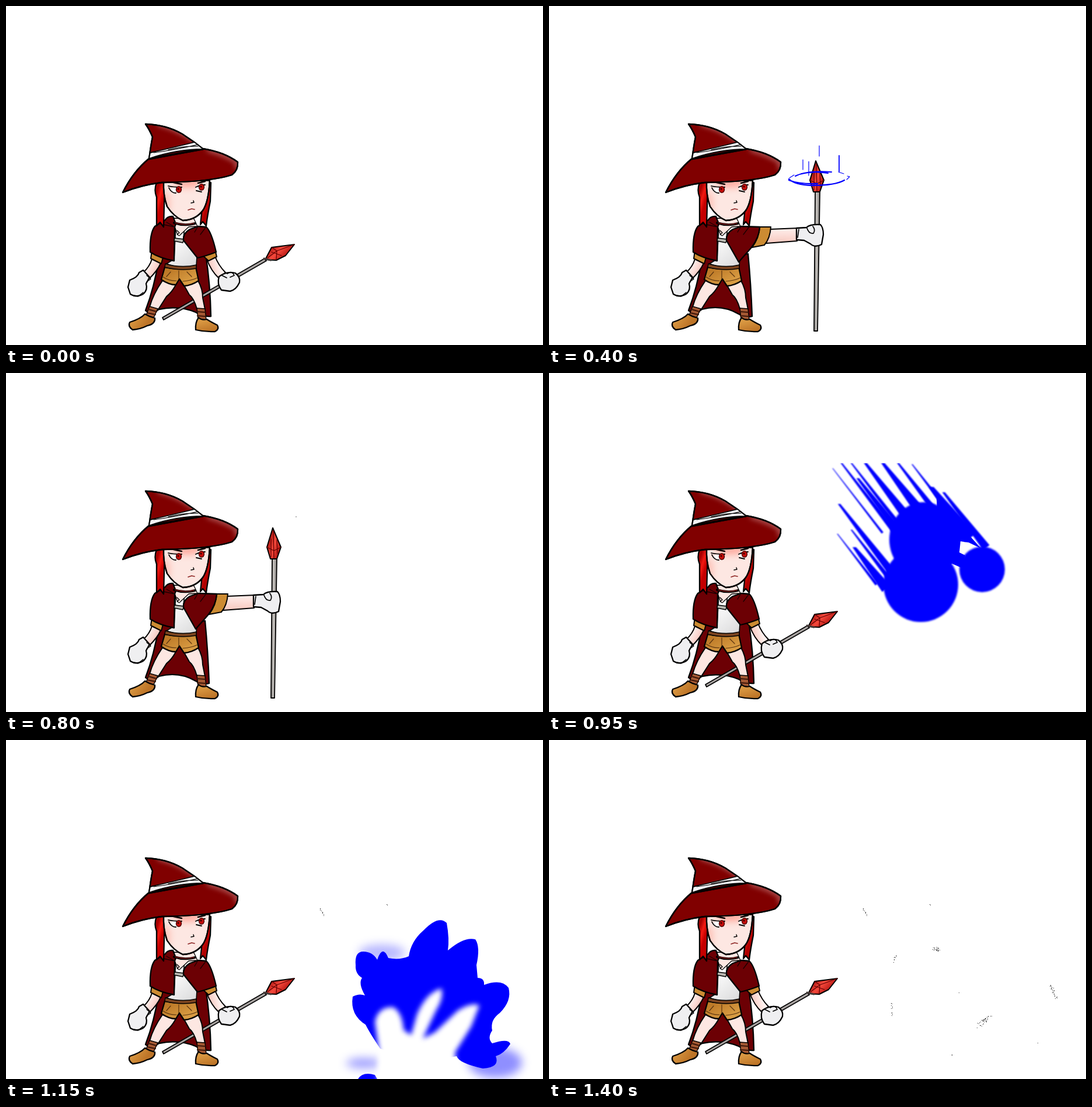
Animation of 920x580 px, one loop 1450 ms. Source, as an HTML page with a canvas:

```html
<!DOCTYPE html>
<html lang="en">
<head>
<meta charset="utf-8">
<title>Mage casting a meteor</title>
<style>
html, body { margin: 0; width: 100%; height: 100%; overflow: hidden; background: #fff; }
canvas { display: block; }
</style>
</head>
<body>
<canvas id="stage" width="920" height="580"></canvas>
<script>
const ctx = document.getElementById('stage').getContext('2d');
const LOOP = 1450;
const BLUE = '#0000ff', RED = '#800000', CAPE = '#6c0004', SKIN = '#fde7e2',
      CLOTH = '#cc8b32', WHITE = '#efeff1', STEEL = '#aaa5a3';

function shape(d, fill, line = 2.3, ink = '#000') {
  const path = new Path2D(d);
  if (fill) { ctx.fillStyle = fill; ctx.fill(path); }
  if (line) { ctx.strokeStyle = ink; ctx.lineWidth = line; ctx.stroke(path); }
}
const stroke = (d, width = 2.3, ink = '#000') => shape(d, null, width, ink);

function disc(x, y, r, fill, ry = r) {
  ctx.beginPath();
  ctx.ellipse(x, y, r, ry, 0, 0, Math.PI * 2);
  ctx.fillStyle = fill;
  ctx.fill();
}

function fade(x0, y0, x1, y1, ...colors) {
  const g = ctx.createLinearGradient(x0, y0, x1, y1);
  colors.forEach((c, i) => g.addColorStop(i / (colors.length - 1), c));
  return g;
}

function soft(blur, draw) {
  ctx.save();
  ctx.filter = `blur(${blur}px)`;
  draw();
  ctx.restore();
}

function inside(d, draw) {
  ctx.save();
  ctx.clip(new Path2D(d));
  draw();
  ctx.restore();
}

function random(seed) {
  return () => (seed = (seed * 16807) % 2147483647) / 2147483647;
}

// ---- mage ----

function cloak(casting) {
  shape(casting
    ? 'M262 432 Q254 482 239 521 Q248 529 262 519 Q296 510 325 527 Q338 534 348 531 Q346 476 341 424 Z'
    : 'M262 432 Q254 482 239 521 Q248 529 262 519 Q296 512 325 524 Q338 532 351 531 Q350 476 342 424 Z', CAPE);
}

function legs() {
  shape('M268 470 L291 477 Q284 490 275 497 L261 519 L246 515 Q252 493 268 470 Z', SKIN, 2);
  shape('M305 478 L329 470 Q337 484 337 499 L341 519 L327 518 Q322 500 314 494 Z', SKIN, 2);
  shape('M246 514 L260 518 L253 533 L240 529 Z', '#a65a34', 1.5);
  shape('M327 517 L341 518 L343 537 L329 536 Z', '#a65a34', 1.5);
  stroke('M244 519 L258 523 M242 525 L256 528 M328 523 L341 524 M328 530 L342 531', 2.2, '#3b1508');
  shape('M238 527 Q231 535 212 541 Q208 548 217 554 Q230 553 242 547 Q256 544 255 534 Q246 532 238 527 Z',
    fade(215, 537, 235, 552, '#d99842', '#bd7427'));
  shape('M330 533 Q324 541 325 554 Q341 558 358 557 Q366 553 362 546 Q350 540 344 536 Q335 538 330 533 Z',
    fade(340, 538, 345, 557, '#d99842', '#bd7427'));
}

function torso() {
  shape('M272 447 Q298 453 325 446 L330 470 Q318 478 305 479 L297 467 L291 477 Q279 477 266 468 Z',
    fade(285, 450, 300, 478, '#bd7a28', '#d89b42'));
  stroke('M268 463 Q280 471 292 470 M303 471 Q317 470 328 465 M296 453 L296 467 M282 455 L275 463 M310 455 L318 463', 1.2, '#5c3510');
  shape('M291 376 L306 379 L304 397 L327 429 L326 445 Q300 451 275 441 L288 433 Z',
    fade(280, 400, 315, 445, '#fff', '#dededf'), 1.6);
  shape('M273 441 Q300 449 326 443 L326 449 Q300 454 272 447 Z', '#7c4520', 1.5);
  shape('M287 363 L289 377 L293 389 Q296 396 299 391 L313 378 L328 377 L322 364 Z', SKIN, 1.3);
  stroke('M293 384 L297 388 L293 391', 1.3);
}

function leftArm() {
  shape('M250 433 L265 440 Q260 452 246 466 L236 455 Q246 446 250 433 Z',
    fade(242, 447, 257, 455, '#fff0ed', '#f7c9c1'), 2);
  shape('M250 418 L269 430 L266 441 L248 432 Z', CLOTH, 2);
  shape('M235 452 L246 464 L240 475 Q243 485 236 492 Q224 500 213 493 L209 481 L212 469 Q226 464 228 456 Z', WHITE);
  stroke('M241 472 L248 467 L241 461 M226 497 L235 490', 1.5);
}

function mantle(casting) {
  shape('M273 366 Q277 359 286 360 L291 373 L289 378 L288 436 Q262 431 247 421 Q246 389 255 377 Z', CAPE);
  shape(casting
    ? 'M304 401 Q303 389 315 382 L329 377 L361 378 Q360 396 347 413 L325 438 Z'
    : 'M304 401 Q303 389 315 382 L329 377 L343 378 Q352 386 360 421 Q342 428 328 431 Z', CAPE);
  stroke('M275 370 L289 378 L265 373 M329 377 L323 387 M342 379 L333 391', 1.3, '#1a0000');
  shape('M289 397 L304 399 L303 405 L288 402 Z', '#b9b8b1', 1.3);
}

function head() {
  shape('M258 302 Q253 315 258 327 L258 376 L264 370 L270 378 L272 302 Z', fade(258, 320, 271, 324, '#a90000', '#f31a12', '#c40000'));
  shape('M343 300 L351 302 L350 334 Q345 359 343 376 L337 369 L333 374 L336 346 Z', fade(338, 330, 349, 334, '#f01812', '#b00000'));
  stroke('M288 371 Q306 377 324 372', 4);
  stroke('M290 371 Q306 376 322 372', 1.5, '#7a1010');
  const face = 'M270 300 Q269 323 276 343 Q287 360 303 367 Q325 366 337 350 Q347 336 349 298 Z';
  shape(face, SKIN);
  inside(face, () => {
    soft(6, () => {
      disc(311, 302, 25, '#ff8f80aa', 9);
      disc(274, 336, 7, '#ffab9daa', 19);
    });
  });
  stroke(face);
  disc(291, 315, 9, '#fff', 5);
  disc(333, 311, 8, '#fff', 6);
  stroke('M278 308 Q286 310 301 310 M279 311 Q283 320 291 320 M325 310 Q333 306 341 306 M326 316 L335 318', 1.8);
  [[296, 314], [335, 310]].forEach(([x, y]) => {
    disc(x, y, 5.2, '#4c0000', 6);
    disc(x, y, 3.8, '#c50b08', 4.5);
    disc(x - 1, y - 1, 1.5, '#330000');
  });
  stroke('M287 302 L301 305 M329 303 L341 300', 2.6);
  stroke('M321 333 L322 336 L317 337', 1.4);
  stroke('M312 349 L318 347 L323 348', 1.6, '#8d2523');
}

function hat() {
  const brim = 'M245 261 Q218 283 200 319 Q232 306 267 302 Q350 301 387 289 Q398 281 397 267 Q374 250 337 244 Z';
  const crown = 'M239 202 Q274 203 302 219 Q321 231 338 245 L245 262 Q248 239 251 224 Q245 210 239 202 Z';
  shape(brim, RED);
  shape(crown, RED);
  inside(crown, () => soft(4, () => stroke('M263 202 Q302 211 335 240', 7, '#b86c6c')));
  inside(brim, () => soft(4, () => stroke('M347 246 Q381 256 397 268 L395 276', 6, '#b86767')));
  stroke(brim);
  stroke(crown);
  shape('M247 251 Q287 242 323 233 L338 245 Q293 245 245 261 Z', '#f4f4f6', 1.8);
  stroke('M253 251 Q291 246 329 237 M278 246 Q307 239 329 240', 1.2);
}

function gem(d, facets, ...axis) {
  shape(d, fade(...axis, '#a90f0c', '#f4493c', '#b71612'), 2);
  stroke(facets, 1.3, '#650000');
}

function idleStaff() {
  shape('M268 533 L443 432 L446 436 L270 537 Z', STEEL, 1.7);
  gem('M444 434 L455 413 L494 408 L479 427 L463 435 Z', 'M448 431 L464 419 L494 408 M455 413 L464 419 L463 434 M455 421 L472 427', 452, 412, 474, 434);
  stroke('M442 432 L454 435', 3, '#443b39');
}

function idleArm() {
  shape('M344 433 L358 428 Q364 444 376 456 L365 466 Q351 453 344 433 Z',
    fade(348, 447, 365, 443, '#f5c7bf', '#fff0ed'), 2);
  shape('M334 424 L358 416 L361 429 L347 436 Z', CLOTH, 2);
  shape('M365 463 Q378 453 393 457 Q402 464 400 473 Q394 486 384 488 L369 486 Q361 476 365 463 Z', WHITE);
  stroke('M370 461 L378 465 M379 458 Q387 452 391 461 L384 464', 1.7);
}

function castStaff() {
  shape('M456 318 L464 318 L460 556 L454 556 Z', fade(454, 400, 463, 400, '#858280', '#c3c0bc', '#8f8b89'), 1.8);
  gem('M457 265 L471 298 L464 318 L453 318 L447 298 Z', 'M458 270 L459 317 M447 298 L459 304 L471 298 M454 284 L454 315 M464 285 L465 309', 448, 290, 471, 297);
}

function castArm() {
  shape('M378 382 L427 380 L425 402 L372 406 Z', fade(400, 380, 400, 404, '#fff0ed', '#f8cbc2'), 2);
  shape('M361 378 L380 378 Q379 397 369 409 L348 413 Q360 397 361 378 Z', CLOTH, 2);
  shape('M424 380 L441 379 Q447 373 465 374 Q470 379 470 391 L467 408 Q455 414 448 407 L437 401 L424 400 Z', WHITE);
  stroke('M442 380 Q445 390 453 389 Q457 383 452 377 M428 382 L426 396', 1.7);
}

function mage(casting) {
  cloak(casting);
  if (!casting) idleStaff();
  legs();
  torso();
  leftArm();
  if (casting) { castStaff(); castArm(); } else idleArm();
  mantle(casting);
  head();
  hat();
}

// ---- magic ----

function ring(t) {
  const step = (t - 400) / 100;
  if (t >= 200 && t <= 500) {
    const size = 1 + Math.min(0, step) * 0.18;
    ctx.save();
    ctx.translate(463, 294);
    ctx.scale(size, size);
    stroke('M-41 -3 Q-20 -13 21 -10 M-31 -7 Q-10 -12 15 -8', 2, BLUE);
    stroke('M-52 2 Q-42 12 -13 13 Q28 13 43 4 M-52 4 Q-35 11 -3 10', 2.3, BLUE);
    stroke('M-51 0 L-43 -5 M33 -10 L42 -7 M48 -3 L52 -2 L47 3', 1.1, BLUE);
    ctx.restore();
  }
  if (t >= 300 && t <= 600) {
    const cut = t === 600 ? 8 : 0;
    [[435, 263, 17], [445, 266, 24], [463, 239, 18], [497, 256, 27]].forEach(([x, y, h]) =>
      stroke(`M${x} ${y - step * 10} v${h - cut}`, x === 497 ? 1.8 : 1.2, BLUE));
  }
  if (t >= 700) disc(497, 246, 0.7, '#333');
}

// A tapering trail that widens from (x, y) along the flight direction.
function streak(x, y, length, width) {
  const dx = 0.61, dy = 0.79, ex = x + dx * length, ey = y + dy * length, w = width / 2, tip = width / 6;
  shape(`M${x - tip} ${y} L${ex - dy * w} ${ey + dx * w} L${ex + dy * w} ${ey - dx * w} L${x + tip} ${y} Z`, BLUE, 0);
}

function meteor(dx, dy) {
  ctx.save();
  ctx.translate(dx, dy);
  ctx.beginPath();
  ctx.rect(470, 154, 330, 290);
  ctx.clip();
  soft(1, () => {
    [[486, 163, 140, 4], [501, 154, 160, 9], [518, 154, 140, 8], [542, 154, 120, 16], [572, 154, 110, 18],
     [598, 154, 115, 11], [622, 156, 90, 6], [529, 180, 120, 14], [497, 224, 145, 13], [494, 275, 110, 5],
     [523, 298, 90, 18], [518, 268, 110, 8], [655, 195, 110, 24], [676, 204, 120, 14]]
      .forEach(s => streak(...s));
  });
  soft(1.5, () => {
    disc(642, 285, 59, BLUE, 64);
    disc(637, 362, 64, BLUE);
    disc(742, 336, 39, BLUE);
  });
  shape('M664 214 L706 262 L740 300 L719 290 L705 288 L703 307 L713 312 L706 333 L690 326 L670 352 Z', BLUE, 0);
  ctx.restore();
}

const BURST = `M611 365 Q628 385 643 386 L646 380 L652 387 L665 387 L675 391 L689 380 Q699 346 727 333
  Q740 320 748 311 Q743 333 746 352 L745 374 L752 378 Q771 352 804 347 Q798 370 801 383 Q799 394 803 408
  L802 425 L812 428 L806 437 Q828 427 838 431 L837 441 L857 436 Q842 466 821 488 Q819 513 809 529
  Q803 551 787 552 L680 553 Q645 541 638 519 Q604 486 600 453 L613 446 L621 439 L613 420 L619 408 Q609 392 611 365 Z`;

const LOBES = `M599 385 Q597 362 612 362 Q628 362 636 376 Q645 349 655 373 Q674 377 690 370 Q694 344 715 326
  Q741 299 755 313 Q760 341 757 360 Q785 336 804 341 Q813 354 806 385 L808 407 Q820 407 819 419 Q849 408 861 424
  Q867 446 846 467 Q829 479 833 497 Q824 510 833 519 Q861 510 864 520 Q853 537 839 541 Q847 560 817 562
  Q776 553 772 541 L714 552 L641 528 Q623 501 616 487 Q589 470 594 439 Q605 433 615 437 Q603 416 610 407 Q598 400 599 385 Z`;

const RAYS = `M639 532 L632 482 Q638 456 663 457 Q679 466 681 496 L694 505 L704 470 Q720 432 746 425 Q750 442 737 462
  L714 511 L735 500 L774 463 Q798 448 811 454 L797 490 L769 535 L776 582 L636 582 Z`;

function splats() {
  shape('M584 550 L626 544 L625 547 Z M621 560 Q635 551 649 554 Q666 551 674 560 Q649 574 621 568 Z M628 542 L642 536 L651 544 L633 548 Z', BLUE, 0);
  shape('M650 553 Q673 545 690 565 L676 579 L667 574 Z M745 558 L776 563 L771 570 Z M789 544 Q818 537 841 541 Q836 559 811 567 L793 561 Z', BLUE, 0);
  soft(2, () => stroke('M626 532 L650 538 M650 564 L688 571', 3, '#8080ff'));
}

function sunburst(x, y, r) {
  let d = '';
  for (let i = 0; i < 36; i++) {
    const a = i * Math.PI / 18, q = r * (i % 2 ? 0.62 : 1);
    d += `${i ? 'L' : 'M'}${x + Math.cos(a) * q} ${y + Math.sin(a) * q}`;
  }
  soft(2, () => shape(d + 'Z', '#fff', 0));
}

function impact() {
  shape(BURST, BLUE, 0);
  splats();
  sunburst(712, 555, 32);
}

// White rays eat the burst from its foot upwards.
function dissolve(amount) {
  soft(4, () => {
    ctx.translate(709, 575);
    ctx.scale(amount, amount);
    ctx.translate(-709, -575);
    shape(RAYS, '#fff', 0);
  });
}

function billow(amount) {
  soft(8, () => {
    disc(644, 364, 40, '#0000ff48', 14);
    disc(613, 553, 30, '#0000ff60', 9);
    disc(838, 552, 46, '#0000ff70', 26);
  });
  shape(LOBES, BLUE, 0);
  shape('M603 580 Q611 567 632 573 L636 580 Z', BLUE, 0);
  dissolve(amount);
}

function remnants(alpha) {
  ctx.save();
  ctx.globalAlpha = alpha;
  soft(3, () => {
    stroke('M591 369 Q598 362 610 364 M589 453 Q588 468 594 474 M649 361 Q660 354 671 358', 7, BLUE);
    stroke('M705 336 Q733 307 754 315 M779 352 Q796 341 805 348 M837 421 Q862 415 865 439', 12, BLUE);
    stroke('M735 490 L756 470', 10, BLUE);
  });
  ctx.restore();
}

function specks(groups) {
  const next = random(91);
  ctx.fillStyle = '#333';
  groups.forEach(([x, y, dx, dy, spread, count]) => {
    for (let i = 0; i < count; i++) {
      const k = next();
      ctx.fillRect(Math.round(x + dx * k + (next() - 0.5) * spread), Math.round(y + dy * k + (next() - 0.5) * spread), 1, 1);
    }
  });
}

function magic(t) {
  if (t < 900) { if (t >= 200) ring(t); return; }
  if (t === 900) meteor(-55, -148);
  if (t === 950) meteor(0, 0);
  if (t === 1000) meteor(54, 127);
  if (t === 1050) impact();
  if (t === 1100) billow(0.5);
  if (t === 1150) billow(1);
  if (t === 1200) remnants(0.75);
  if (t === 1250) remnants(0.25);
  if (t >= 1050) specks([[537, 288, 9, 12, 2, 10], [651, 280, 2, 2, 1, 3]]);
  if (t >= 1250) {
    specks([[657, 356, 13, 2, 6, 24], [594, 368, -6, 16, 2, 9], [587, 450, 0, 24, 2, 10],
            [858, 418, 12, 24, 5, 26], [735, 489, 21, -18, 7, 42], [702, 432, 0, 0, 1, 1],
            [690, 538, 2, 1, 1, 2], [837, 518, 0, 0, 1, 1]]);
  }
}

function frame() {
  const now = performance.now() % LOOP;
  const step = now < 900 ? 100 : 50;
  const t = Math.floor(now / step) * step;
  ctx.fillStyle = '#fff';
  ctx.fillRect(0, 0, 920, 580);
  ctx.lineJoin = 'round';
  ctx.lineCap = 'round';
  mage(t >= 100 && t < 900);
  magic(t);
  requestAnimationFrame(frame);
}
frame();
</script>
</body>
</html>
```
